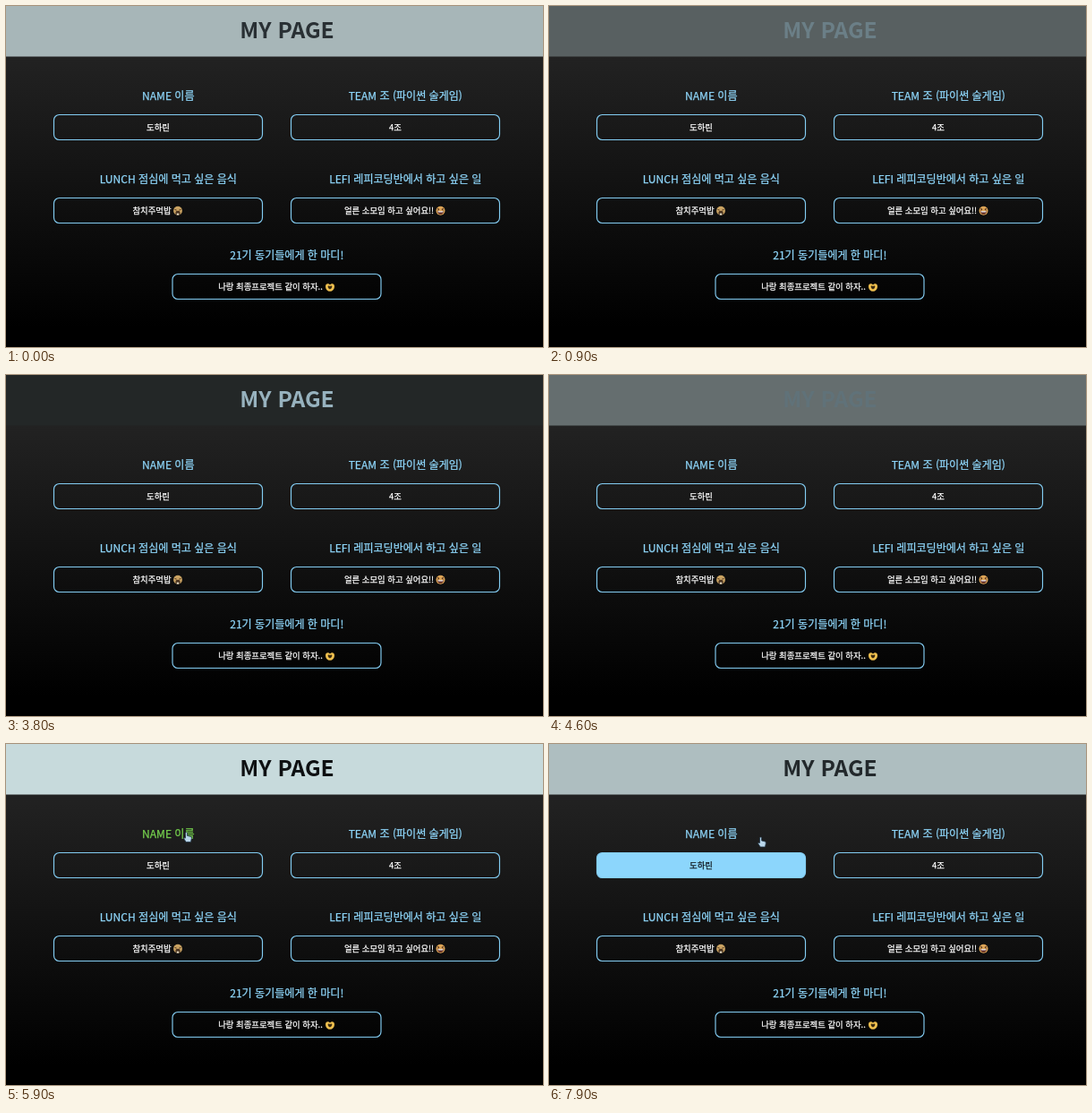
An HTML page for the animation above (8000 ms loop, 600 px wide and 381 px high).

```html
<!DOCTYPE html>
<html lang="ko">
<head>
<meta charset="utf-8">
<title>My page</title>
<style>
  html, body { margin: 0; width: 100%; height: 100%; overflow: hidden; background: #000; }
  svg { display: block; width: 600px; height: 381px; }
  text { font-family: "Noto Sans CJK KR", "Noto Sans CJK JP", "Noto Sans CJK", "Noto Sans", sans-serif; text-anchor: middle; }
  .title { font-size: 24.6px; font-weight: 700; }
  .label, .value { font-weight: 500; fill: currentColor; stroke: currentColor; stroke-width: .25; }
  .label { font-size: 12.05px; color: #8ed6fa; }
  .value { font-size: 9.4px; color: #fff; }
  .box { fill: #8cd6fc; fill-opacity: 0; stroke: #83cdf3; stroke-width: 1.15; }
</style>
</head>
<body>
<svg viewBox="0 0 600 381">
  <defs>
    <linearGradient id="shade" x1="0" y1="0" x2="0" y2="1">
      <stop offset="0" stop-color="#262626"/>
      <stop offset=".15" stop-color="#222"/>
      <stop offset=".94" stop-color="#000"/>
    </linearGradient>
  </defs>
  <rect width="600" height="381" fill="url(#shade)"/>
  <rect id="header" width="600" height="56.5"/>
  <text id="title" class="title" x="314" y="36.3">MY PAGE</text>
  <g id="form"></g>

  <g transform="translate(192 228.7)">
    <circle r="4.9" fill="#c9a262"/>
    <path d="M-3.4-1.2l2 .6M3.4-1.2l-2 .6" stroke="#4a3018"/>
    <path d="M-2.6 4.2V2a2.6 2 0 0 1 5.2 0V4.2z" fill="#4a3420"/>
    <path d="M-1.2 4.8V3h2.4v1.8z" fill="#e8e0cc"/>
  </g>
  <g transform="translate(485.5 228.7)">
    <circle r="5" fill="#dca456"/>
    <path d="M-3.4-2.4l2 1-2 1M3.4-2.4l-2 1 2 1" fill="none" stroke="#4a2a1a" stroke-width=".9"/>
    <path d="M-3.4.6H3.4A3.4 3.4 0 0 1-3.4.6z" fill="#5a2622"/>
    <path d="M-3 .6H3L2.7 1.8H-2.7z" fill="#fff"/>
  </g>
  <g transform="translate(362 314.2)">
    <path d="M0 4.6C-3 4.6-5 2-5-1S-2-5 0-2.6C2-5 5-4 5-1S3 4.6 0 4.6z" fill="#eebf4e"/>
    <path d="M0 2.4C-2.6.8-2.8-1.6-1.4-1.8Q-.4-1.8 0-.8Q.4-1.8 1.4-1.8C2.8-1.6 2.6.8 0 2.4z" fill="#3a2a10"/>
  </g>

  <g id="cursor" stroke-linejoin="round">
    <path id="arrow" d="M0 0V8.6L2 6.8 3.4 9.8 4.8 9.2 3.5 6.3H6.2z" fill="#cbd8e0" stroke="#1a2330" stroke-width=".9"/>
    <path id="hand" d="M-1 .8Q0-.6 1 .8V4L5 5Q6 5.4 5.8 7L5 11H-.4L-2.8 7.2Q-3 5.8-1 6.6z" fill="#b9d6ea" stroke="#24384a" stroke-width=".8"/>
  </g>
</svg>
<script>
const LOOP = 8000, DARKEST = 2680, HALF = 4000;
const $ = id => document.getElementById(id);

// box left, box top, label, value, shift that leaves room for an emoji
const fields = [
  [53, 121.5, "NAME 이름", "도하린", 0],
  [318, 121.5, "TEAM 조 (파이썬 술게임)", "4조", 0],
  [53, 214.5, "LUNCH 점심에 먹고 싶은 음식", "참치주먹밥", -7],
  [318, 214.5, "LEFI 레피코딩반에서 하고 싶은 일", "얼른 소모임 하고 싶어요!!", -7],
  [185.5, 299.5, "21기 동기들에게 한 마디!", "나랑 최종프로젝트 같이 하자..", -7],
];
$("form").innerHTML = fields.map(([x, y, label, value, shift]) => `
  <text class="label" x="${x + 128.3}" y="${y - 17}">${label}</text>
  <rect class="box" x="${x + .5}" y="${y}" width="233" height="28" rx="6"/>
  <text class="value" x="${x + 117 + shift}" y="${y + 17.5}">${value}</text>`).join("");
const [nameLabel, nameBox, nameValue] = $("form").children;

// time, x, y
const path = [
  [4950, 600, 52], [5100, 585, 40], [5500, 578, 38], [5800, 201.5, 98.5],
  [6350, 201.5, 98.5], [6650, 196, 131], [7500, 205, 133], [7900, 236.5, 104],
];

const clamp = v => Math.min(1, Math.max(0, v));
const smooth = u => u * u * (3 - 2 * u);
const mix = (a, b, p) => `rgb(${a.map((v, i) => Math.round(v + (b[i] - v) * p))})`;

// cubic-bezier(.42, 0, .58, 1)
function easeInOut(x) {
  let lo = 0, hi = 1;
  for (let i = 0; i < 20; i++) {
    const u = (lo + hi) / 2, v = 1 - u;
    if (1.26 * v * v * u + 1.74 * v * u * u + u * u * u < x) lo = u; else hi = u;
  }
  return smooth(lo);
}

function cursorAt(t) {
  const next = path.findIndex(k => k[0] > t);
  if (next < 0) return path[path.length - 1].slice(1);
  const [t0, x0, y0] = path[Math.max(0, next - 1)], [t1, x1, y1] = path[next];
  const p = t1 > t0 ? smooth(clamp((t - t0) / (t1 - t0))) : 0;
  return [x0 + (x1 - x0) * p, y0 + (y1 - y0) * p];
}

function draw(t) {
  const phase = (t - DARKEST + LOOP) % LOOP;
  const light = easeInOut(1 - Math.abs(1 - phase / HALF));
  $("header").setAttribute("fill", mix([0, 0, 0], [216, 236, 238], light));
  $("title").setAttribute("fill", mix([180, 213, 227], [0, 0, 0], light));

  const [x, y] = cursorAt(t), hand = t > 5770;
  $("cursor").setAttribute("transform", `translate(${x} ${y})`);
  $("cursor").style.display = t < path[0][0] ? "none" : "";
  $("arrow").style.display = hand ? "none" : "";
  $("hand").style.display = hand ? "" : "none";

  nameLabel.style.color = t > 5770 && t < 6430 ? "#76d14e" : "";
  const fill = clamp((t - 6550) / 300);
  nameBox.style.fillOpacity = fill;
  nameValue.style.color = mix([255, 255, 255], [16, 24, 30], fill);
}

const start = performance.now();
function tick() {
  draw((performance.now() - start) % LOOP);
  requestAnimationFrame(tick);
}
tick();
</script>
</body>
</html>
```
